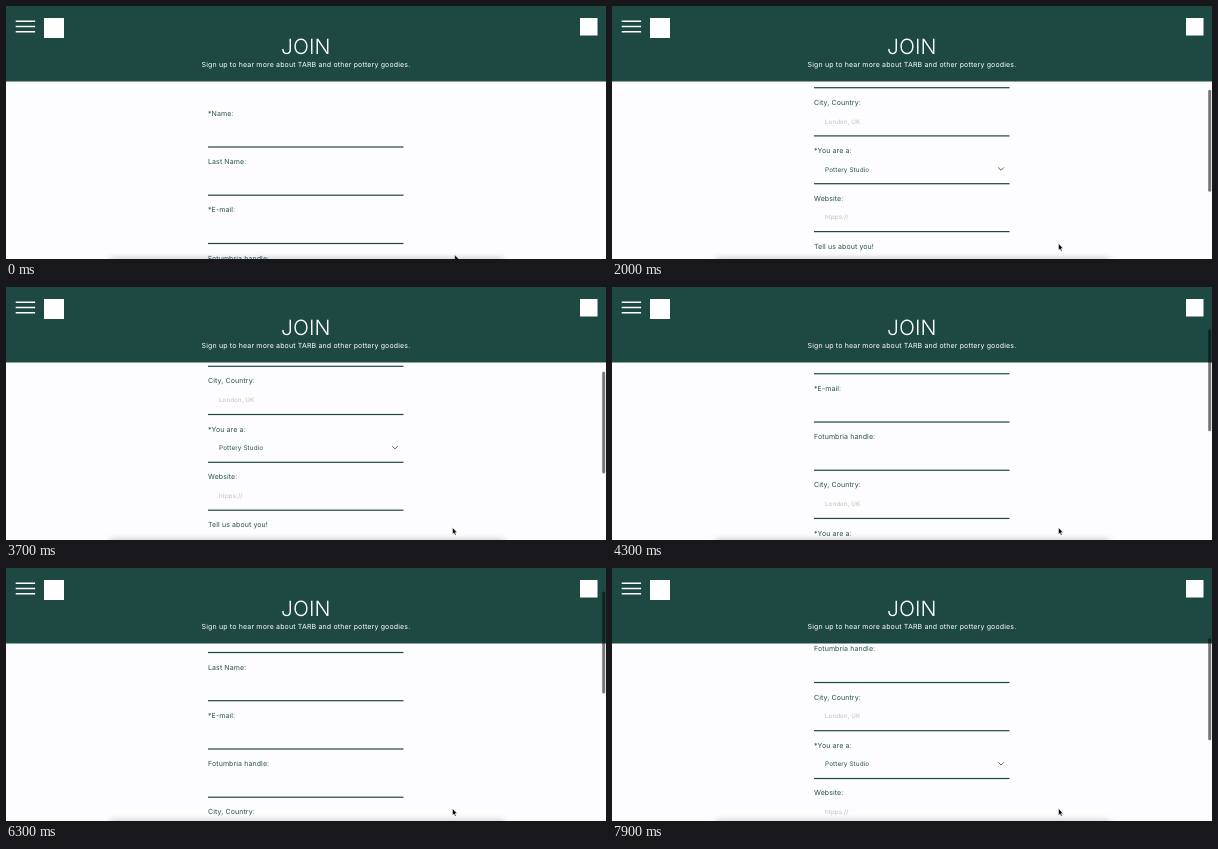
An HTML page that plays this animation: 600 by 253 pixels, repeating every 8000 ms.

```html
<!DOCTYPE html>
<html lang="en">
<head>
<meta charset="utf-8">
<title>Join form</title>
<style>
  html, body { margin: 0; width: 100%; height: 100%; overflow: hidden; background: #fdfcfe; }
  svg { display: block; width: 600px; height: 253px; }
  text {
    font: 400 7px Inter, "Open Sans", sans-serif; letter-spacing: .1px;
    text-rendering: geometricPrecision; fill: #28524c;
  }
  .hint { font-size: 6.2px; fill: #bcbdbf; }
  .choice { font-size: 6.4px; }
  .lead { letter-spacing: .16px; fill: #fff; text-anchor: middle; }
  .title { font-size: 21px; font-weight: 300; letter-spacing: .1px; fill: #fff; text-anchor: middle; }
  .button { font-size: 7.5px; fill: #fff; text-anchor: middle; }
</style>
</head>
<body>
<svg viewBox="0 0 600 253" xmlns="http://www.w3.org/2000/svg">
  <defs>
    <filter id="soft" x="-10%" y="-300%" width="120%" height="700%">
      <feGaussianBlur stdDeviation="3.5"/>
    </filter>
  </defs>
  <rect width="600" height="253" fill="#fdfcfe"/>

  <g id="form">
    <path d="M386.2 365.5l2.8 2.8l2.8 -2.8" fill="none" stroke="#1e4943" stroke-width=".8"/>
    <path d="M393.8 524.4l3 -3M395.6 524.4l1.2 -1.2" stroke="#999" stroke-width=".5"/>
    <rect x="203.7" y="539" width="5.8" height="5.8" rx="1" fill="#fff" stroke="#999" stroke-width=".6"/>
    <text x="216" y="544.7" style="letter-spacing:.12px">I'd like to receive updates and newsletters via email.</text>
    <rect x="266" y="574.8" width="68" height="13.8" rx="2" fill="#1e4943"/>
    <text class="button" x="300" y="584">Submit</text>
  </g>

  <rect width="600" height="75.5" fill="#1e4943"/>
  <path d="M9.7 15.3h19.4M9.7 20.5h19.4M9.7 25.7h19.4" stroke="#fff" stroke-width="1.4"/>
  <rect x="38" y="12" width="20" height="20" fill="#fff"/>
  <rect x="574" y="12" width="17.5" height="17.5" fill="#fff"/>
  <text class="title" x="299.8" y="48">JOIN</text>
  <text class="lead" x="300" y="61.4">Sign up to hear more about TARB and other pottery goodies.</text>

  <rect x="104" y="253" width="394" height="8" fill="#000" opacity=".26" filter="url(#soft)"/>
  <rect id="thumb" x="596.2" width="3" height="102" rx="1.5" fill="#000" opacity=".53"/>
  <path id="cursor" d="M0 0V6.6L1.5 5.3L2.6 7.7L3.7 7.2L2.6 4.9H4.6Z"
        fill="#000" stroke="#fff" stroke-width=".5" stroke-linejoin="round"/>
</svg>
<script>
const LOOP = 8000, STEP = 100;
const form = document.getElementById("form");
const thumb = document.getElementById("thumb");
const cursor = document.getElementById("cursor");

function add(tag, attrs, label) {
  const el = document.createElementNS("http://www.w3.org/2000/svg", tag);
  for (const key in attrs) el.setAttribute(key, attrs[key]);
  if (label) el.textContent = label;
  form.append(el);
}

function addText(x, middle, label, kind = "") {
  add("text", { x, y: middle + 2.5, class: kind }, label);
}

// label, its vertical middle, its underline
const fields = [
  ["*Name:", 107.2, 141],
  ["Last Name:", 155.5, 189.2],
  ["*E-mail:", 203.8, 237.5],
  ["Fotumbria handle:", 252, 285.7],
  ["City, Country:", 300.3, 333.9],
  ["*You are a:", 348.6, 381.7],
  ["Website:", 396.1, 429.6],
  ["Tell us about you!", 444.4, 525.9]
];
for (const [label, middle, line] of fields) {
  addText(202, middle, label);
  add("rect", { x: 202, y: line - .6, width: 195.5, height: 1.2, fill: "#1e4943" });
}
addText(213, 319, "London, UK", "hint");
addText(213, 367, "Pottery Studio", "choice");
addText(213, 414.8, "htpps://", "hint");
addText(213, 462.9, "What are your pottery likes,practice, courses,", "hint");
addText(213, 470.1, "workshops, makers and exhibitions?", "hint");

// [time, scroll offset]
const scrollKeys = [
  [0, 0], [600, 0], [700, 6], [1000, 62], [1300, 119], [1500, 139],
  [2000, 204], [2400, 288], [2800, 357], [3000, 364], [3200, 363],
  [3400, 310], [3700, 206.4], [4000, 135], [4200, 108], [4400, 100],
  [4500, 100], [4700, 75], [5000, 21.5], [5200, 6], [5400, 0], [5800, 0],
  [6000, 10], [6300, 56.5], [6700, 101], [6900, 114], [7100, 114],
  [7400, 146], [7700, 146], [7900, 171.2], [8000, 171.2]
];

// Smooth through the keys without overshooting.
function slope(keys, i) {
  if (i === 0 || i === keys.length - 1) return 0;
  const rise = k => (keys[k + 1][1] - keys[k][1]) / (keys[k + 1][0] - keys[k][0]);
  const a = rise(i - 1), b = rise(i);
  return a * b <= 0 ? 0 : 2 * a * b / (a + b);
}

function sample(keys, t) {
  let i = 0;
  while (i < keys.length - 2 && t >= keys[i + 1][0]) i++;
  const [t0, v0] = keys[i], [t1, v1] = keys[i + 1];
  const span = t1 - t0, u = (t - t0) / span, w = 1 - u;
  return v0 * (1 + 2 * u) * w * w + v1 * u * u * (3 - 2 * u)
    + span * u * w * (slope(keys, i) * w - slope(keys, i + 1) * u);
}

function draw(time) {
  const t = Math.floor((time % LOOP) / STEP) * STEP;
  const scroll = sample(scrollKeys, t);
  form.setAttribute("transform", `translate(0 ${-scroll})`);
  thumb.setAttribute("y", .6 + scroll * .407);
  thumb.setAttribute("visibility", t < 700 ? "hidden" : "visible");

  const rise = Math.min(t / 300, 1);
  const x = 448.7 - 2.2 * rise;
  const y = t < 3300 ? 248.8 - 11.2 * rise : 240.6;
  cursor.setAttribute("transform", `translate(${x} ${y})`);
}

const start = performance.now();
function tick() {
  draw(performance.now() - start);
  requestAnimationFrame(tick);
}
tick();
</script>
</body>
</html>
```
